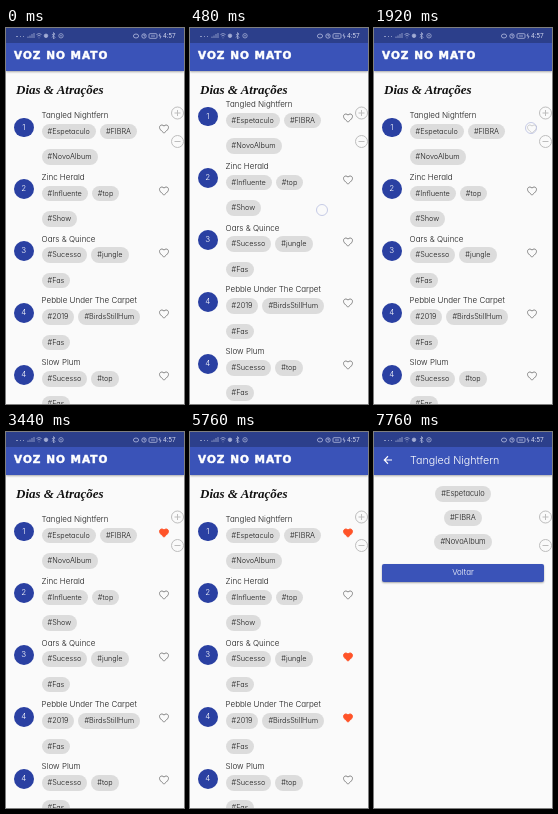
Write an HTML page that moves like this. It is 178 by 376 pixels and loops after 8 s.

```html
<!DOCTYPE html>
<html lang="pt">
<head>
<meta charset="utf-8">
<title>Dias &amp; Atrações</title>
<style>
  html, body { margin: 0; width: 100%; height: 100%; overflow: hidden; }
  body {
    position: relative; background: #fafafa; color: #1c1c1c;
    font: 300 8px/12px Inter, "Open Sans", sans-serif;
    font-feature-settings: "cv11"; white-space: nowrap;
  }
  .abs, .item, .item > * { position: absolute; }
  .bar { left: 0; right: 0; top: 15px; height: 27.5px; background: #3a53b8; color: #fff; box-shadow: 0 1px 2px #0005; }
  .brand { left: 8px; top: 6px; font: bold 10.5px/13px "DejaVu Sans", sans-serif; letter-spacing: 1px; -webkit-text-stroke: .5px #fff; }
  .heading { left: 10px; top: 52px; color: #111; font: italic bold 13px/20px "Liberation Serif", serif; }
  .viewport { left: 0; right: 0; top: 72px; bottom: 0; overflow: hidden; }
  .item { left: 0; width: 178px; height: 61.8px; }
  .name { left: 35.6px; top: 0; }
  .badge { left: 7.9px; top: 8.6px; width: 19.8px; border-radius: 50%; background: #2a40a2; color: #fff; text-align: center; line-height: 19.8px; }
  .row { left: 35.6px; display: flex; gap: 4px; }
  .chip { padding: 0 6px; border-radius: 8px; background: #dcdcdc; font-size: 7.3px; line-height: 15.6px; }
  .heart { left: 152.2px; top: 14px; width: 12px; height: 12px; fill: none; stroke: #858585; stroke-width: 2; }
  .heart.on { fill: #ff5328; stroke: #ff5328; }
  .touch { width: 10px; height: 10px; margin: -6px; border: 1px solid #c6cbe6; border-radius: 50%; background: #fafafa99; }
  #detail { inset: 0; background: #fafafa; }
  #detail .chips { top: 54.2px; left: 0; width: 178px; display: flex; flex-direction: column; align-items: center; gap: 8.3px; }
  #detail .chip { font-size: 7.5px; }
  .button { left: 8px; top: 132px; width: 162px; background: #3a53b8; color: #fff; border-radius: 2px; line-height: 17.8px; text-align: center; box-shadow: 0 1px 2px #0005; }
  .status { left: 0; top: 0; }
</style>
</head>
<body>
<div class="abs bar"><span class="abs brand">VOZ NO MATO</span></div>
<div class="abs heading">Dias &amp; Atrações</div>
<div class="abs viewport"><div class="abs" id="list"></div></div>
<div class="abs touch" id="touch"></div>

<div class="abs" id="detail">
  <div class="abs bar">
    <svg class="abs" style="left:8px;top:7px" width="12" height="12" viewBox="0 0 24 24" fill="none" stroke="#fff" stroke-width="2.2"><path d="M20 12H5M12 4.5 4.5 12l7.5 7.5"/></svg>
    <span class="abs" style="left:36px;top:6px;font-size:10.7px;line-height:15px" id="detailName"></span>
  </div>
  <div class="abs chips" id="detailChips"></div>
  <div class="abs button">Voltar</div>
</div>

<svg class="abs status" width="178" height="376">
  <rect width="178" height="15" fill="#2c3f8b"/>
  <g fill="none" stroke="#a3acd4" stroke-width=".8">
    <path d="M10 8.5h2M14 8.5h1M17 8.5h1M22 10V8.5M24 10V7.5M26 10V6M28 10V5"/>
    <path d="M30.5 6.5q2.5-2 5 0M31.5 8q1.5-1.2 3 0M33 9.5v.8"/>
    <circle cx="40" cy="7.8" r="1.8" fill="#a3acd4"/>
    <path d="M46 6l3 3.5-1.5 1.5V4.5L49 6l-3 3.5"/>
    <circle cx="55" cy="7.8" r="2.2"/><path d="M54 7.8h2"/>
  </g>
  <g fill="none" stroke="#b4bce0" stroke-width=".8">
    <ellipse cx="130" cy="8" rx="2.6" ry="2"/>
    <circle cx="138" cy="8" r="2.2"/><path d="M138 6.5V8h1"/>
    <rect x="143" y="5.7" width="8" height="4.6" rx="1"/><path d="M145 8h4M154 5.5l-1 2.5h2l-1 2.5"/>
  </g>
  <text x="157" y="10.3" fill="#cfd4ec" font-family="Roboto, sans-serif" font-weight="400" font-size="6.5">4:57</text>
  <g fill="#fafafa" stroke="#bdbdbd">
    <circle cx="171.5" cy="85" r="6"/><circle cx="171.5" cy="113.5" r="6"/>
    <path d="M168.5 85h6M171.5 82v6M168.5 113.5h6"/>
  </g>
</svg>

<script>
const LOOP = 8000, STEP = 80, PITCH = 61.8;
const HEART = "M12 20.3l-1.3-1.2C6 15 3 12.2 3 8.7 3 6 5.1 4 7.7 4c1.6 0 3.2.8 4.3 2.2C13.1 4.8 14.7 4 16.3 4 18.9 4 21 6 21 8.7c0 3.5-3 6.3-7.7 10.4z";

// likedAt: moment the heart fills
const acts = [
  { day: 1, name: "Tangled Nightfern", tags: ["#Espetaculo", "#FIBRA", "#NovoAlbum"], likedAt: 2400 },
  { day: 2, name: "Zinc Herald", tags: ["#Influente", "#top", "#Show"] },
  { day: 3, name: "Oars & Quince", tags: ["#Sucesso", "#jungle", "#Fas"], likedAt: 5760 },
  { day: 4, name: "Pebble Under The Carpet", tags: ["#2019", "#BirdsStillHum", "#Fas"], likedAt: 4400 },
  { day: 4, name: "Slow Plum", tags: ["#Sucesso", "#top", "#Fas"] },
];
const touches = [
  { from: 160, to: 1200, x: 131.5, y: 193, drags: true },
  { from: 1920, to: 2160, x: 157, y: 100 },
  { from: 4000, to: 4240, x: 159, y: 288 },
  { from: 5120, to: 5520, x: 162, y: 226 },
  { from: 7120, to: 7520, x: 136.5, y: 131 },
];
const scrollKeys = [[160, 0], [480, 11], [560, 12], [800, 6], [960, 0]];

const byId = id => document.getElementById(id);
const clamp = v => Math.max(0, Math.min(1, v));
const chips = tags => tags.map(tag => `<span class="chip">${tag}</span>`).join("");
const escapeText = s => s.replace("&", "&amp;");

byId("list").innerHTML = acts.map((act, i) => `
  <div class="item" style="top:${9 + i * PITCH}px">
    <div class="badge">${act.day}</div>
    <div class="name">${escapeText(act.name)}</div>
    <div class="row" style="top:14.8px">${chips(act.tags.slice(0, 2))}</div>
    <div class="row" style="top:40.3px">${chips(act.tags.slice(2))}</div>
    <svg class="heart" viewBox="0 0 24 24"><path d="${HEART}"/></svg>
  </div>`).join("");
byId("detailName").textContent = acts[0].name;
byId("detailChips").innerHTML = chips(acts[0].tags);
const hearts = document.querySelectorAll(".heart");

function scrollAt(t) {
  for (let i = 1; i < scrollKeys.length; i++) {
    const [t0, a] = scrollKeys[i - 1], [t1, b] = scrollKeys[i];
    if (t < t1) return a + (b - a) * clamp((t - t0) / (t1 - t0));
  }
  return 0;
}

function draw(t) {
  const scroll = scrollAt(t);
  byId("list").style.transform = `translateY(${-scroll}px)`;
  hearts.forEach((heart, i) => heart.classList.toggle("on", t >= acts[i].likedAt));

  const touch = touches.find(p => t >= p.from && t < p.to);
  const dot = byId("touch").style;
  dot.opacity = touch ? clamp((touch.to - t) / 240) : 0;
  if (touch) {
    dot.left = touch.x + "px";
    dot.top = touch.y - (touch.drags ? scroll : 0) + "px";
  }
  byId("detail").style.opacity = clamp((t - 7360) / 400);
}

const start = performance.now();
function frame() {
  const t = (performance.now() - start) % LOOP;
  draw(Math.floor(t / STEP) * STEP);
  requestAnimationFrame(frame);
}
frame();
</script>
</body>
</html>
```
